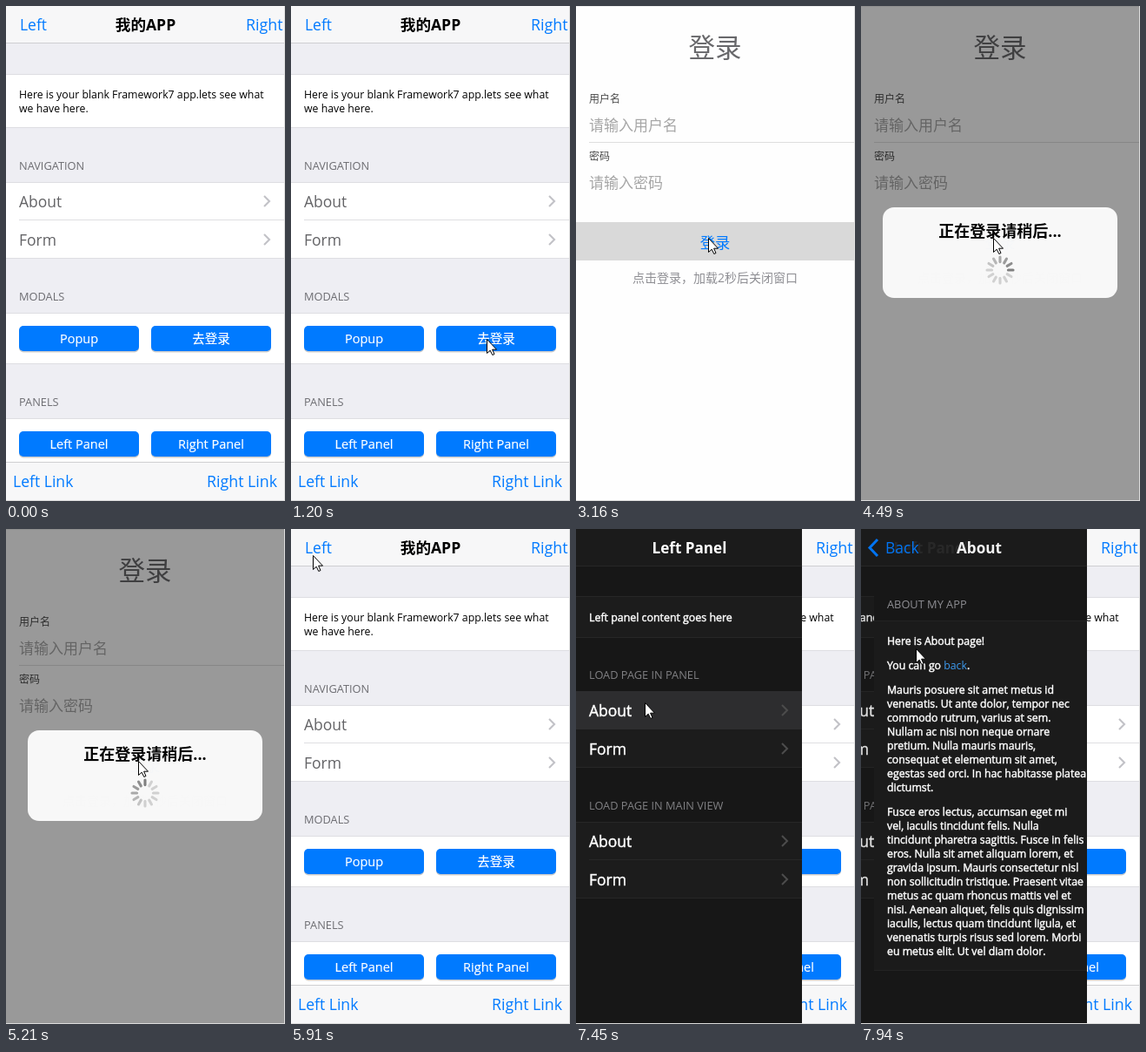
These frames come from a looping animation (321 px wide and 568 px high, 8 s). An HTML page:

```html
<!DOCTYPE html>
<html lang="zh-CN">
<head>
<meta charset="utf-8">
<title>我的APP</title>
<style>
  html, body { margin: 0; height: 100%; overflow: hidden; background: #fff; }
  svg { display: block; width: 100vw; height: 100vh; }
  text { font-family: "Open Sans", "Noto Sans CJK SC", "Noto Sans CJK JP", "Noto Sans CJK", sans-serif; white-space: pre; }
  .mid { text-anchor: middle; }
  .bold { font-weight: 700; }
  .firm { stroke: #fff; stroke-width: .45px; }
  .label { stroke: #fff; stroke-width: .2px; }
</style>
</head>
<body>
<svg id="stage" viewBox="0 0 321 568"></svg>
<script>
const BLUE = '#007aff';
const stage = document.getElementById('stage');

// Markup helpers
const text = (x, y, size, fill, str, cls = '') =>
  `<text x="${x}" y="${y}" font-size="${size}" fill="${fill}" class="${cls}">${str}</text>`;
const rect = (x, y, w, h, fill, extra = '') =>
  `<rect x="${x}" y="${y}" width="${w}" height="${h}" fill="${fill}" ${extra}/>`;
const group = (id, body, extra = '') => `<g id="${id}" ${extra}>${body}</g>`;
const block = (y, h, w, fill, line) =>
  rect(0, y, w, h, fill) + rect(0, y, w, 1, line) + rect(0, y + h - 1, w, 1, line);
const chevron = (x, y, color) =>
  `<path d="M${x} ${y - 6}l6 6-6 6" fill="none" stroke="${color}" stroke-width="2.1"/>`;
const button = (x, y, label) =>
  rect(x, y + 1.5, 138, 29, '#000', 'rx="5" opacity=".2"') + rect(x, y, 138, 29, BLUE, 'rx="5"') +
  text(x + 69, y + 20, 14.5, '#fff', label, 'mid label');
const heading = (x, y, label, color = '#6d6d72') => text(x, y, 12.8, color, label);

function list(y, w, c, cls) {
  return block(y, 88, w, c.fill, c.line) + rect(15, y + 43, w, 1, c.line) +
    ['About', 'Form'].map((label, i) =>
      text(15, y + 29 + i * 44, 17.5, c.text, label, cls) +
      chevron(w - 23, y + 22 + i * 44, c.arrow)).join('');
}

const light = { fill: '#fff', line: '#dedee2', text: '#636366', arrow: '#c2c2c7' };
const dark = { fill: '#1c1c1c', line: '#272727', text: '#fff', arrow: '#4c4c4c' };

const mainView =
  rect(0, 0, 321, 568, '#eeeef3') +
  block(78, 62, 321, '#fff', light.line) +
  text(15, 106, 12.3, '#000', 'Here is your blank Framework7 app.lets see what') +
  text(15, 122, 12.3, '#000', 'we have here.') +
  heading(15, 188, 'NAVIGATION') + list(202, 320, light) +
  heading(15, 338, 'MODALS') + block(352, 59, 321, '#fff', light.line) +
  button(15, 367, 'Popup') + button(167, 367, '去登录') +
  heading(15, 459, 'PANELS') + block(473, 59, 321, '#fff', light.line) +
  button(15, 488, 'Left Panel') + button(167, 488, 'Right Panel') +
  rect(0, 0, 321, 43, '#f7f7f8') + rect(0, 42, 321, 1, '#cfcfd1') +
  group('leftLink', text(16, 28, 17.5, BLUE, 'Left')) +
  text(160.5, 28, 17.6, '#000', '我的APP', 'mid bold') +
  text(276, 28, 17.8, BLUE, 'Right') +
  rect(0, 523, 321, 45, '#f7f7f8') + rect(0, 523, 321, 1, '#cfcfd1') +
  text(8, 552, 17.6, BLUE, 'Left Link') + text(231, 552, 17.8, BLUE, 'Right Link');

const loginView =
  rect(0, 0, 321, 568, '#fefefe') + rect(0, 0, 321, 1, '#eee') +
  text(160, 58.5, 30.5, '#68686b', '登录', 'mid') +
  text(15, 111, 12, '#4a4a4a', '用户名') + text(15, 142.5, 17, '#a6a6a6', '请输入用户名') +
  rect(15, 156, 306, 1, '#dedede') +
  text(15, 177, 12, '#4a4a4a', '密码') + text(15, 208.5, 17, '#a6a6a6', '请输入密码') +
  rect(0, 248, 321, 44, '#d9d9d9', 'id="loginPress"') +
  text(160, 277.5, 17.3, BLUE, '登录', 'mid') +
  text(160, 317, 14, '#8e8e93', '点击登录，加载2秒后关闭窗口', 'mid');

const spokes = Array.from({ length: 12 }, (_, i) =>
  `<path d="M0-9.4V-15" transform="rotate(${i * 30})" opacity="${i < 6 ? .27 : .27 + (i - 5) * .097}"/>`).join('');
const modalBox =
  rect(-135, -52, 270, 104, '#fafafa', 'rx="13" opacity=".98"') +
  text(0, -18, 18, '#000', '正在登录请稍后...', 'mid bold') +
  `<g transform="translate(0 20)" stroke="#6c6c6c" stroke-width="3.1" stroke-linecap="round">${group('spinner', spokes)}</g>`;

const paragraphs = [
  [189, `Mauris posuere sit amet metus id
venenatis. Ut ante dolor, tempor nec
commodo rutrum, varius at sem.
Nullam ac nisi non neque ornare
pretium. Nulla mauris mauris,
consequat et elementum sit amet,
egestas sed orci. In hac habitasse platea
dictumst.`],
  [329, `Fusce eros lectus, accumsan eget mi
vel, iaculis tincidunt felis. Nulla
tincidunt pharetra sagittis. Fusce in felis
eros. Nulla sit amet aliquam lorem, et
gravida ipsum. Mauris consectetur nisl
non sollicitudin tristique. Praesent vitae
metus ac quam rhoncus mattis vel et
nisi. Aenean aliquet, felis quis dignissim
iaculis, lectus quam tincidunt ligula, et
venenatis turpis risus sed lorem. Morbi
eu metus elit. Ut vel diam dolor.`]
].map(([y, body]) => body.split('\n').map((line, i) =>
  text(15, y + i * 16, 12.3, '#fff', line, 'firm')).join('')).join('');

const panelHome =
  block(77, 48, 260, dark.fill, dark.line) +
  text(15, 106, 12.4, '#fff', 'Left panel content goes here', 'firm') +
  heading(15, 172, 'LOAD PAGE IN PANEL', '#808083') + list(186, 260, dark, 'firm') +
  group('rowPress', rect(0, 186, 260, 44, '#2d2d2f') +
    text(15, 215, 17.5, '#fff', 'About', 'firm') + chevron(237, 208, dark.arrow)) +
  heading(15, 322, 'LOAD PAGE IN MAIN VIEW', '#808083') + list(336, 260, dark, 'firm');

const aboutPage =
  rect(0, 43, 260, 525, '#171717') +
  heading(15, 91, 'ABOUT MY APP', '#8e8e93') +
  block(105, 402, 260, '#1b1b1b', '#232323') +
  text(15, 133, 12.3, '#fff', 'Here is About page!', 'firm') +
  text(15, 161, 12.3, '#fff', 'You can go <tspan fill="#3d9bf0" stroke="none">back</tspan>.', 'firm') +
  paragraphs;

const panelView =
  rect(0, 0, 260, 568, '#171717') +
  group('home', panelHome) + group('about', aboutPage) +
  rect(0, 0, 260, 43, '#1b1b1b') + rect(0, 42, 260, 1, '#272727') +
  group('homeTitle', text(130.5, 28, 17.1, '#fff', 'Left Panel', 'mid bold')) +
  group('aboutTitle', text(130, 28, 17.1, '#fff', 'About', 'mid bold')) +
  group('backArrow', `<path d="M19 12l-9 9.5 9 9.5" fill="none" stroke="${BLUE}" stroke-width="3"/>`) +
  group('backText', text(25, 28, 17.5, BLUE, 'Back'));

stage.innerHTML =
  '<clipPath id="panelClip"><path d="M0 0H260V568H0Z"/></clipPath>' +
  mainView + group('login', loginView) +
  rect(0, 0, 321, 568, '#000', 'id="shade"') + group('modal', modalBox) +
  group('panel', panelView, 'clip-path="url(#panelClip)"') +
  rect(320, 0, 1, 568, '#dcdcdc') + rect(0, 567, 321, 1, '#dcdcdc') +
  group('cursor', '<path d="M.5.5V16.5L4.2 13.2 6.8 18.5 9 17.5 6.6 12.2H11.5Z" fill="#fff" stroke="#000"/>');

const parts = {};
stage.querySelectorAll('[id]').forEach(el => parts[el.id] = el);

// Timing helpers
const clamp = v => Math.min(1, Math.max(0, v));
const bezier = (a, b, u) => 3 * a * u * (1 - u) ** 2 + 3 * b * u * u * (1 - u) + u ** 3;
function ease(p) {
  let lo = 0, hi = 1;
  for (let i = 0; i < 20; i++) {
    const mid = (lo + hi) / 2;
    if (bezier(.25, .25, mid) < p) lo = mid; else hi = mid;
  }
  return bezier(.1, 1, lo);
}
const ramp = (t, start, length) => {
  const p = clamp((t - start) / length);
  return p === 0 || p === 1 ? p : ease(p);
};
const press = (t, down, up, fade) => t < down ? 0 : 1 - clamp((t - up) / fade);

const cursorPath = [
  [750, 322, 432], [1200, 225, 382], [2230, 225, 382], [2710, 155, 269], [2740, 155, 269],
  [2820, 152, 266], [5430, 152, 266], [5830, 33, 38], [5910, 25, 30], [6030, 24, 25],
  [6250, 24, 25], [6480, 68, 66], [6970, 79, 208], [7210, 79, 208], [7290, 79, 199],
  [7640, 79, 199], [7940, 63, 137], [8000, 62, 134]
];
function cursorAt(t) {
  const i = cursorPath.findIndex(k => k[0] > t);
  if (i < 1) return cursorPath[0].slice(1);
  const [t0, x0, y0] = cursorPath[i - 1], [t1, x1, y1] = cursorPath[i];
  const p = (t - t0) / (t1 - t0);
  return [x0 + (x1 - x0) * p, y0 + (y1 - y0) * p];
}

// Positions snap to whole pixels
const move = (name, x, y = 0, more = '') =>
  parts[name].setAttribute('transform', `translate(${Math.round(x)} ${Math.round(y)}) ${more}`);
const fade = (name, value) => parts[name].setAttribute('opacity', value);

function draw(t) {
  const loginOpen = ramp(t, 1905, 278), loginClose = ramp(t, 5310, 360);
  move('login', 0, 568 * (1 - loginOpen + loginClose));
  fade('loginPress', press(t, 3160, 3310, 300));

  const modalIn = ramp(t, 3300, 370);
  fade('shade', .4 * (modalIn - loginClose));
  fade('modal', modalIn - loginClose);
  move('modal', 160, 283, `scale(${1.185 - .185 * modalIn - .185 * loginClose})`);
  parts.spinner.setAttribute('transform', `rotate(${30 * Math.floor((t - 4160) / 79)})`);

  fade('leftLink', 1 - .7 * press(t, 6060, 6200, 300));
  move('panel', -260 * (1 - ramp(t, 6225, 320)));
  fade('rowPress', press(t, 7450, 7630, 200));

  const turn = ramp(t, 7620, 455);
  move('home', -52 * turn);
  fade('home', 1 - .15 * turn);
  move('about', 260 * (1 - turn));
  move('homeTitle', -53 * turn);
  fade('homeTitle', 1 - turn);
  move('aboutTitle', 103 * (1 - turn));
  move('backText', 53 * (1 - turn));
  for (const name of ['aboutTitle', 'backText', 'backArrow']) fade(name, turn);

  move('cursor', ...cursorAt(t));
}

const start = performance.now();
function tick() {
  draw((performance.now() - start) % 8000);
  requestAnimationFrame(tick);
}
tick();
</script>
</body>
</html>
```
